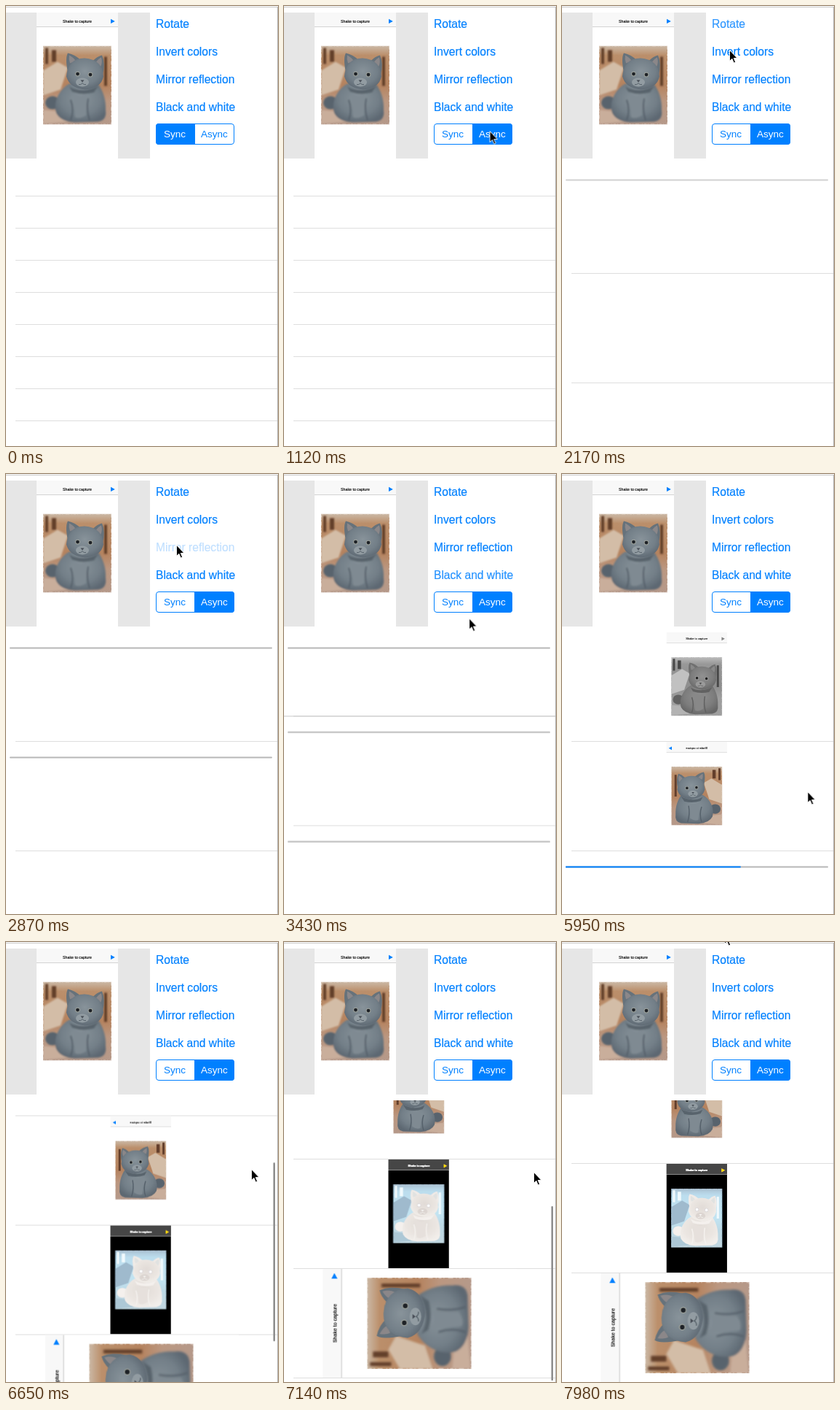
An HTML page that plays this animation: 374 by 603 pixels, repeating every 8120 ms.

```html
<!DOCTYPE html>
<html lang="en">
<head>
<meta charset="utf-8">
<title>Image filters</title>
<style>
  html, body { margin: 0; width: 100%; height: 100%; overflow: hidden; background: #fff; }
  svg { display: block; font-family: "Liberation Sans", Arial, sans-serif; }
  .link, .seg, .scroll, .push, .row, .img, .bar, .fill, .lines, .edge, .thumb, .cursor {
    animation: 8120ms linear infinite;
  }
  .img, .bar, .fill, .lines, .seg, .edge { animation-timing-function: step-end; }

  /* buttons: press, hold, fade back */
  .link {
    font-size: 15.6px; fill: #0080ff; stroke: #0080ff; stroke-width: .2px;
    animation-name: press;
  }
  @keyframes press {
    0% { opacity: 1 }
    .01% { opacity: .25 }
    2.2% { opacity: .25; animation-timing-function: ease-out }
    6%, 100% { opacity: 1 }
  }

  /* segmented control */
  .seg { font-size: 13.5px; }
  .sync { animation-name: sync; }
  .async { animation-name: async; }
  .tint { animation-name: tint; }
  @keyframes sync { 0% { opacity: 1 } 12.9%, 100% { opacity: 0 } }
  @keyframes async { 0% { opacity: 0 } 12.9%, 100% { opacity: 1 } }
  @keyframes tint { 0% { opacity: 0 } 11.1% { opacity: .18 } 12.9%, 100% { opacity: 0 } }

  /* list: short empty rows, then tall rows */
  .short { animation-name: short; }
  .tall { animation-name: tall; }
  @keyframes short { 0% { opacity: 1 } 24.9%, 100% { opacity: 0 } }
  @keyframes tall { 0% { opacity: 0 } 24.9%, 100% { opacity: 1 } }

  /* every insertion fades a row in and pushes the older ones down */
  .row1 { animation-name: row1; }
  .row2 { animation-name: row2; }
  .row3 { animation-name: row3; }
  .row4 { animation-name: row4; }
  @keyframes row1 { 0%, 24.5% { opacity: 0 } 28%, 100% { opacity: 1 } }
  @keyframes row2 { 0%, 30.2% { opacity: 0 } 32.8%, 100% { opacity: 1 } }
  @keyframes row3 { 0%, 36.2% { opacity: 0 } 38.6%, 100% { opacity: 1 } }
  @keyframes row4 { 0%, 39.8% { opacity: 0 } 42.2%, 100% { opacity: 1 } }
  .push2 { animation-name: push2; }
  .push3 { animation-name: push3; }
  .push4 { animation-name: push4; }
  @keyframes push2 {
    0%, 30.2% { transform: translateY(0); animation-timing-function: ease-in-out }
    33.9%, 100% { transform: translateY(150px) }
  }
  @keyframes push3 {
    0%, 36.2% { transform: translateY(0); animation-timing-function: ease-in-out }
    39.7%, 100% { transform: translateY(150px) }
  }
  @keyframes push4 {
    0%, 39.79% { transform: translateY(0); animation-timing-function: ease-in-out }
    43.48%, 100% { transform: translateY(150px) }
  }
  .edge2 { animation-name: edge2; }
  .edge3 { animation-name: edge3; }
  .edge4 { animation-name: edge4; }
  @keyframes edge2 { 0% { opacity: 0 } 30.2% { opacity: 1 } 33.9%, 100% { opacity: 0 } }
  @keyframes edge3 { 0% { opacity: 0 } 36.2% { opacity: 1 } 39.7%, 100% { opacity: 0 } }
  @keyframes edge4 { 0% { opacity: 0 } 39.8% { opacity: 1 } 43.5%, 100% { opacity: 0 } }

  /* progress and results */
  .fill2 { animation-name: fill2; }
  .fill3 { animation-name: fill3; }
  @keyframes fill2 { 0% { width: 0 } 47.3% { width: 120.3px } 64.6%, 100% { width: 240.7px } }
  @keyframes fill3 { 0% { width: 0 } 49.9% { width: 120.3px } 61.1%, 100% { width: 240.7px } }
  .img1 { animation-name: img1; }
  .img2 { animation-name: img2; }
  .img3 { animation-name: img3; }
  .img4 { animation-name: img4; }
  @keyframes img1 { 0% { opacity: 0 } 62%, 100% { opacity: 1 } }
  @keyframes img2 { 0% { opacity: 0 } 77.5%, 100% { opacity: 1 } }
  @keyframes img3 { 0% { opacity: 0 } 70.6%, 100% { opacity: 1 } }
  @keyframes img4 { 0% { opacity: 0 } 60.3%, 100% { opacity: 1 } }
  .bar1 { animation-name: bar1; }
  .bar2 { animation-name: bar2; }
  .bar3 { animation-name: bar3; }
  .bar4 { animation-name: bar4; }
  @keyframes bar1 { 0% { opacity: 1 } 62%, 100% { opacity: 0 } }
  @keyframes bar2 { 0% { opacity: 1 } 77.5%, 100% { opacity: 0 } }
  @keyframes bar3 { 0% { opacity: 1 } 70.6%, 100% { opacity: 0 } }
  @keyframes bar4 { 0% { opacity: 1 } 60.3%, 100% { opacity: 0 } }

  /* drag, overshoot, settle */
  .scroll { animation-name: scroll; }
  @keyframes scroll {
    0%, 80% { transform: translateY(0) }
    81.9% { transform: translateY(-128px); animation-timing-function: ease-out }
    85.4% { transform: translateY(-222px); animation-timing-function: ease-in-out }
    87.93% { transform: translateY(-219px); animation-timing-function: ease-out }
    91.5%, 100% { transform: translateY(-213px) }
  }
  .thumb { animation-name: thumb; transform-origin: 368px 219px; }
  @keyframes thumb {
    0%, 80% { transform: none; opacity: 0 }
    80.3% { transform: translateY(12px); opacity: 1 }
    81.9% { transform: translateY(83px); animation-timing-function: ease-out }
    85.4% { transform: translateY(146px) scaleY(.96) }
    87.93% { transform: translateY(143px) scaleY(.976) }
    91.5% { transform: translateY(137px); opacity: 1 }
    95%, 100% { transform: translateY(137px); opacity: 0 }
  }

  .cursor { animation-name: cursor; }
  @keyframes cursor {
    0%, 2.3% { transform: translate(170px, -20px) }
    2.6% { transform: translate(170px, -10px); animation-timing-function: ease-in-out }
    11.2%, 12.9% { transform: translate(284px, 175px); animation-timing-function: ease-in-out }
    20.7%, 24.4% { transform: translate(230px, 28px); animation-timing-function: ease-in-out }
    26.5%, 34.3% { transform: translate(230px, 60px) }
    35.3%, 36.7% { transform: translate(234px, 97px) }
    37.6%, 39.4% { transform: translate(238px, 136px) }
    42.24% { transform: translate(254px, 197px); animation-timing-function: ease-out }
    51.7%, 53.3% { transform: translate(321px, 384px) }
    56%, 70.5% { transform: translate(376px, 376px); animation-timing-function: ease-out }
    74.1%, 80% { transform: translate(334px, 440px) }
    81.9% { transform: translate(337px, 311px); animation-timing-function: ease-out }
    87.93%, 90.4% { transform: translate(343px, 315px); animation-timing-function: ease-in-out }
    96.5%, 100% { transform: translate(223px, -13px) }
  }
</style>
</head>
<body>
<svg width="374" height="603" viewBox="0 0 374 603">
  <defs>
    <filter id="invert">
      <feColorMatrix values="-1 0 0 0 1  0 -1 0 0 1  0 0 -1 0 1  0 0 0 1 0"/>
    </filter>
    <filter id="gray"><feColorMatrix type="saturate" values="0"/></filter>
    <filter id="soft"><feGaussianBlur stdDeviation="1"/></filter>
    <linearGradient id="room" x2="0" y2="1">
      <stop offset="0" stop-color="#cbb9a6"/>
      <stop offset=".12" stop-color="#bb8f6b"/>
      <stop offset=".5" stop-color="#b5835f"/>
      <stop offset=".7" stop-color="#bb9780"/>
      <stop offset="1" stop-color="#b5998a"/>
    </linearGradient>
    <radialGradient id="fur" cy=".42" r=".6">
      <stop offset="0" stop-color="#88939a"/>
      <stop offset=".65" stop-color="#737f88"/>
      <stop offset="1" stop-color="#5d6872"/>
    </radialGradient>
    <clipPath id="frame"><path d="M0 0h94v108H0z"/></clipPath>
    <clipPath id="list"><path d="M0 217h374v386H0z"/></clipPath>

    <g id="photo" clip-path="url(#frame)">
      <path fill="url(#room)" d="M0 0h94v108H0z"/>
      <g filter="url(#soft)">
        <path fill="#d3bda7" d="M0 34 20 22 34 30 24 60 0 68z"/>
        <path fill="#633f2c" d="M3 3h4v22H3zM12 6h6v16h-6zM84 15h4v40h-4z"/>
        <path fill="#c9ae9b" d="M0 88 20 90 34 104 0 107z"/>
        <ellipse cx="13" cy="78" rx="10" ry="9" fill="#58636d"/>
        <path fill="url(#fur)" d="M36 52C22 60 14 76 18 92Q24 104 44 105L76 104Q88 102 86 88C87 74 82 60 74 50z"/>
        <path fill="#58636c" d="M36 56Q54 66 76 55L70 64Q54 68 40 63z"/>
        <path fill="none" stroke="#56616b" stroke-width="2" d="M38 74q5 14 0 28M62 72q-3 16 2 30"/>
        <path fill="#7f8a92" d="M42 66q10 5 18 1l-1 28q-8 6-15 3z"/>
      </g>
      <path fill="#66727b" d="M34 36Q30 17 34 10 44 12 52 20L68 21Q75 14 81 13 86 24 82 40z"/>
      <path fill="#8b8789" d="M37 24q-2-6-1-11 6 3 9 8zM73 22q4-5 7-6 2 7-1 13z"/>
      <path fill="url(#fur)" d="M32 42Q34 17 57 17 82 19 83 42 80 58 58 60 36 58 32 42z"/>
      <ellipse cx="54" cy="50" rx="9" ry="6" fill="#929ca2"/>
      <g fill="#9ba09a"><circle cx="47.500" cy="38.500" r="3.400"/><circle cx="65" cy="39.500" r="3.400"/></g>
      <g fill="#1d2126"><circle cx="47.500" cy="38.500" r="2.400"/><circle cx="65" cy="39.500" r="2.400"/></g>
      <path fill="#454b54" d="M51.500 47h5L54 50z"/>
      <path fill="none" stroke="#566169" d="M49 53q3 1 5-2 2 3 5 2"/>
      <path fill="none" stroke="#efe6de" stroke-width="2" stroke-opacity=".5" stroke-dasharray="3 2 1 4 5 3 1 2" d="M0 0h94v108H0z"/>
    </g>

    <g id="phone">
      <path fill="#fff" d="M0 0h112v200H0z"/>
      <path fill="#f8f8f8" d="M0 0h112v19H0z"/>
      <path fill="#c4c4c4" d="M0 19h112v.7H0z"/>
      <text x="56" y="14" font-size="5.300" stroke="#000" stroke-width=".12" text-anchor="middle">Shake to capture</text>
      <path fill="#0080ff" d="M102 8.800 107.800 11.900 102 15z"/>
      <use href="#photo" x="9" y="45.600"/>
    </g>

    <rect id="track" x="5" y="21.500" width="361" height="2" rx="1" fill="#b7b7b7"/>
    <path id="line" fill="#dedede" d="M13 0h360v1H13z"/>
    <path id="wide" fill="#c8c8c8" d="M0 0h373v1H0z"/>
  </defs>

  <path fill="#c9c9c9" d="M0 1h374v1H0z"/>
  <path fill="#b4b4b4" d="M373 1h1v602h-1z"/>

  <path fill="#e6e6e6" d="M0 9h198v200H0z"/>
  <use href="#phone" x="42" y="9"/>

  <text class="link" x="206" y="30" style="animation-delay:1815ms">Rotate</text>
  <text class="link" x="206" y="68" style="animation-delay:2265ms">Invert colors</text>
  <text class="link" x="206" y="106" style="animation-delay:2865ms">Mirror reflection</text>
  <text class="link" x="206" y="144" style="animation-delay:3055ms">Black and white</text>

  <g fill="#0080ff">
    <rect x="206.500" y="161.500" width="107" height="28" rx="3.500" fill="none" stroke="#0080ff"/>
    <path class="seg tint" d="M260 162h49a4 4 0 0 1 4 4v19a4 4 0 0 1-4 4h-49z"/>
    <g class="seg sync">
      <path d="M260 161h-50a4 4 0 0 0-4 4v21a4 4 0 0 0 4 4h50z"/>
      <text x="217" y="180" fill="#fff">Sync</text>
      <text x="268" y="180">Async</text>
    </g>
    <g class="seg async">
      <path d="M259 161h51a4 4 0 0 1 4 4v21a4 4 0 0 1-4 4h-51z"/>
      <text x="217" y="180">Sync</text>
      <text x="268" y="180" fill="#fff">Async</text>
    </g>
  </g>

  <g clip-path="url(#list)">
    <g class="lines short">
      <use href="#line" y="260"/><use href="#line" y="304"/>
      <use href="#line" y="348"/><use href="#line" y="392"/>
      <use href="#line" y="436"/><use href="#line" y="480"/>
      <use href="#line" y="524"/><use href="#line" y="568"/>
    </g>
    <g transform="translate(0 216)">
      <g class="scroll">
        <g class="row row4">
          <use class="bar bar4" href="#track"/>
          <g class="img img4"><use href="#phone" filter="url(#gray)" transform="translate(143.500 1) scale(.745)"/></g>
        </g>
        <g class="push push4">
          <use href="#line"/><use class="edge edge4" href="#wide"/>
          <g class="row row3">
            <g class="bar bar3">
              <use href="#track"/>
              <rect class="fill fill3" x="5" y="21.500" width="0" height="2" fill="#0080ff"/>
            </g>
            <g class="img img3"><use href="#phone" transform="translate(227 1) scale(-.745 .745)"/></g>
          </g>
          <g class="push push3">
            <use href="#line"/><use class="edge edge3" href="#wide"/>
            <g class="row row2">
              <g class="bar bar2">
                <use href="#track"/>
                <rect class="fill fill2" x="5" y="21.500" width="0" height="2" fill="#0080ff"/>
              </g>
              <g class="img img2"><use href="#phone" filter="url(#invert)" transform="translate(143.500 1) scale(.745)"/></g>
            </g>
            <g class="push push2">
              <use href="#line"/><use class="edge edge2" href="#wide"/>
              <g class="row row1">
                <use class="bar bar1" href="#track"/>
                <g class="img img1"><use href="#phone" transform="translate(53.500 150) rotate(-90) scale(1.330)"/></g>
              </g>
              <g class="lines tall"><use href="#line" y="150"/><use href="#line" y="300"/></g>
            </g>
          </g>
        </g>
      </g>
    </g>
    <rect class="thumb" x="367.500" y="219" width="2.500" height="245" rx="1.250" fill="#8c8c8c"/>
  </g>

  <path class="cursor" fill="#000" stroke="#fff" stroke-width=".9" d="M.5.500v15l3.400-3.200 2.400 5.700 2.300-1-2.400-5.500h4.700z"/>
</svg>
</body>
</html>
```
